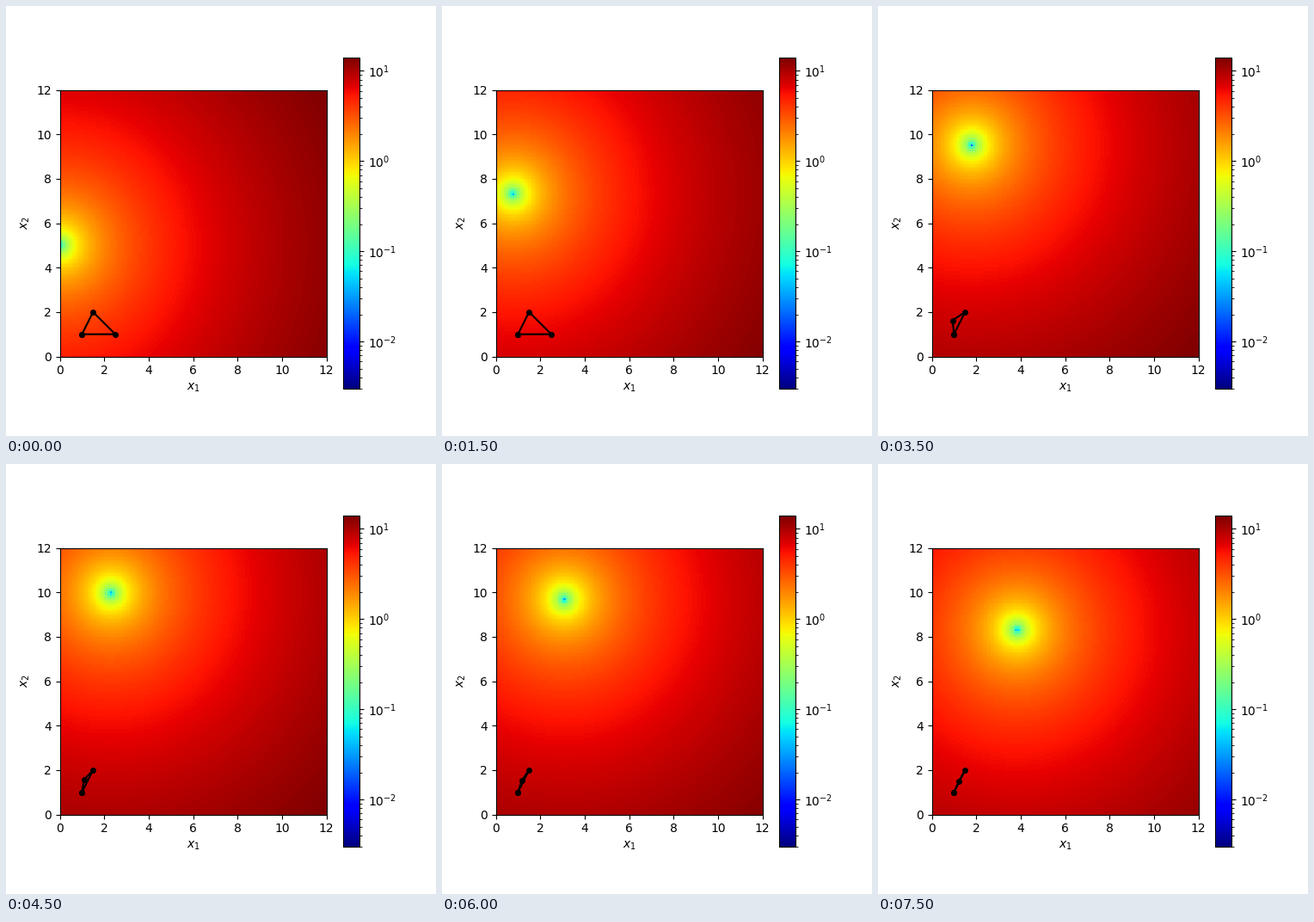
Write a matplotlib script that moves like this. It is 500 px wide and 500 px high and loops after 8 s.

```python
import matplotlib.pyplot as plt
import numpy as np
from matplotlib.animation import FuncAnimation
from matplotlib.colors import LogNorm

FRAMES, INTERVAL = 16, 500
PATH_STEPS = 39          # steps in one full period of the moving optimum
LIMIT = 12

ticks = np.linspace(0, LIMIT, 121)
X1, X2 = np.meshgrid(ticks, ticks)

LOW, TOP = np.array([1.0, 1.0]), np.array([1.5, 2.0])
WORST = np.array([2.5, 1.0])
CENTROID = (LOW + TOP) / 2


def optimum(k):
    x = 10 * k / PATH_STEPS
    return x, 5 + 5 * np.sin(2 * np.pi * k / PATH_STEPS)


def distance(k):
    cx, cy = optimum(k)
    return np.hypot(X1 - cx, X2 - cy)


def simplex(k):
    """Closed triangle: one outside contraction, then an inside one every two steps."""
    contractions = max(0, (k - 3) // 2)
    scale = 1 if contractions == 0 else -0.5 ** contractions
    moving = CENTROID + scale * (WORST - CENTROID)
    return np.array([LOW, moving, TOP, LOW]).T


fig, ax = plt.subplots(figsize=(5, 5), dpi=100)
mesh = ax.pcolormesh(X1, X2, distance(0), shading="nearest", cmap="jet",
                     norm=LogNorm(vmin=0.003, vmax=14))
ax.set_aspect("equal")
ax.set(xlim=(0, LIMIT), ylim=(0, LIMIT), xlabel="$x_1$", ylabel="$x_2$")
ax.set_xticks(range(0, LIMIT + 1, 2))
ax.set_yticks(range(0, LIMIT + 1, 2))
fig.colorbar(mesh, ax=ax)
outline, = ax.plot(*simplex(0), "ko-", lw=1.5, ms=4)


def update(k):
    mesh.set_array(distance(k))
    outline.set_data(*simplex(k))
    return mesh, outline


anim = FuncAnimation(fig, update, frames=FRAMES, interval=INTERVAL,
                     repeat=True, repeat_delay=0)
plt.show()
```
